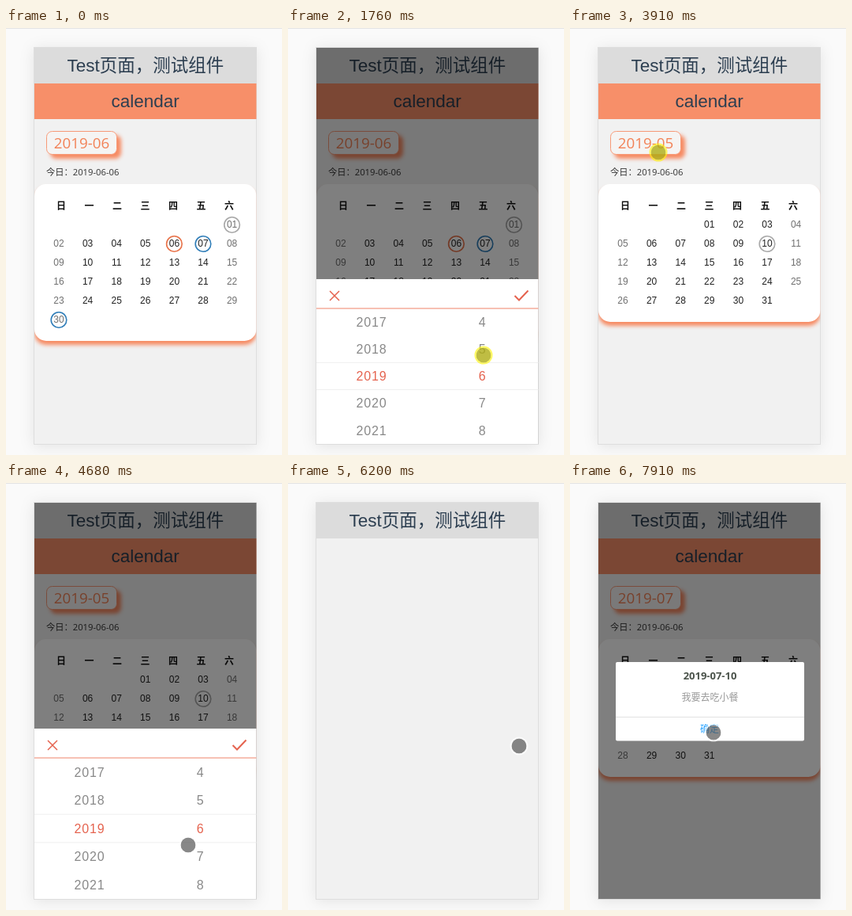
These frames come from a looping animation (350 px wide and 539 px high, 8 s). An HTML page:

```html
<!DOCTYPE html>
<html lang="zh-CN">
<head>
<meta charset="utf-8">
<title>calendar</title>
<style>
html, body { margin: 0; width: 100%; height: 100%; overflow: hidden; background: #fafafa; }
svg { display: block; width: 350px; height: 539px; font-family: "Liberation Sans", "Noto Sans CJK SC", "Noto Sans CJK", sans-serif; }
.human { font-family: "Open Sans", "Noto Sans", "Noto Sans CJK SC", "Noto Sans CJK", sans-serif; }
.mid { text-anchor: middle; }
.big { font-size: 22.5px; fill: #2c3e50; }
.pill { filter: drop-shadow(5px 5px 2.5px #f68a62); }
.card { filter: drop-shadow(0 5px 2.5px #f68a62); }
.phone { filter: drop-shadow(0 2px 9px rgba(0, 0, 0, .09)); }
.pick { font-size: 16px; letter-spacing: .8px; }
.icon { fill: none; stroke: #e5634f; stroke-width: 1.5; }
</style>
</head>
<body>
<svg id="stage" viewBox="0 0 350 539">
  <clipPath id="screen"><rect x="36" y="25" width="281.5" height="500"/></clipPath>
  <path d="M0 .5H350" stroke="#e4e4e4"/>
  <rect class="phone" x="35.5" y="24.5" width="282" height="501" fill="#f1f1f1" stroke="#dedede"/>
  <g clip-path="url(#screen)">
    <rect x="36" y="25" width="282" height="45" fill="#dcdcdc"/>
    <text class="mid big" x="177" y="55">Test页面，测试组件</text>
    <g id="page">
      <rect x="36" y="70" width="282" height="45" fill="#f78f69"/>
      <text class="mid big" x="176.7" y="100">calendar</text>
      <rect class="pill" x="51.5" y="130.5" width="89" height="29" rx="7" fill="#f5f4f3" stroke="#f79a78"/>
      <text id="month" class="mid human" x="96" y="152" font-size="18.75" fill="#f28257"></text>
      <text class="human" x="51" y="186" font-size="11.25" fill="#333">今日：2019-06-06</text>
    </g>
    <rect id="shade" x="36" y="25" width="282" height="500"/>
    <g id="sheets"></g>
    <g id="dialog">
      <rect x="58" y="226" width="239" height="99.5" rx="2" fill="#fff"/>
      <path d="M58 295.5H297" stroke="#e2e2e2"/>
      <g class="mid" font-size="12">
        <text class="human" x="177.5" y="247.5" font-size="13" font-weight="700" fill="#4a524a">2019-07-10</text>
        <text x="177.5" y="274.5" fill="#999">我要去吃小餐</text>
        <text x="177" y="314.5" fill="#26a2ff">确定</text>
      </g>
    </g>
  </g>
  <g id="cursor">
    <circle r="9.5"/>
    <circle r="10.5" fill="none" stroke-width="2"/>
  </g>
</svg>
<script>
const LOOP = 8000, TICK = 76.7, LEAD = 20;
const CORAL = '#e8734a', BLUE = '#2f7db8', GRAY = '#a8a8a8', RED = '#e5634f';
const $ = id => document.getElementById(id);

function add(parent, tag, attrs, text) {
  const el = document.createElementNS('http://www.w3.org/2000/svg', tag);
  for (const k in attrs) el.setAttribute(k, attrs[k]);
  if (text !== undefined) el.textContent = text;
  return parent.appendChild(el);
}
const show = (el, on) => el.style.display = on ? '' : 'none';
const ramp = (t, a, b) => Math.min(1, Math.max(0, (t - a) / (b - a)));
const smooth = p => p * p * (3 - 2 * p);
const easeOut = p => 1 - (1 - p) * (1 - p);
const within = (t, spans) => spans.some(([a, b]) => t >= a && t < b);

function makeCalendar(label, firstDay, days, marks) {
  const g = add($('page'), 'g', { class: 'mid', 'font-size': 12 });
  const rows = Math.ceil((firstDay + days) / 7);
  add(g, 'rect', { class: 'card', x: 36, y: 197, width: 281.5, height: 54 + rows * 24, rx: 15, fill: '#fff' });
  [...'日一二三四五六'].forEach((d, i) =>
    add(g, 'text', { x: 70 + i * 35.5, y: 229, 'font-weight': 700, fill: '#111' }, d));
  for (let d = 1; d <= days; d++) {
    const cell = firstDay + d - 1, col = cell % 7;
    const x = 67 + col * 36.6, y = 248 + Math.floor(cell / 7) * 24;
    if (marks[d]) add(g, 'circle', { cx: x, cy: y + .5, r: 9.8, fill: 'none', stroke: marks[d], 'stroke-width': 1.6 });
    add(g, 'text', { x, y: y + 4.2, fill: col % 6 ? '#222' : '#707070' }, String(d).padStart(2, '0'));
  }
  return { g, label };
}

function makeSheet(top, id) {
  const g = add($('sheets'), 'g', { class: 'mid pick' });
  const body = top + 37, row = (525 - body) / 5;
  const rowY = i => body + row * (i + .5) + 5.7;
  add(g, 'rect', { x: 36, y: top, width: 282, height: 216, fill: '#fff' });
  add(g, 'path', { d: `M53 ${top + 15}l12 12m0 -12l-12 12`, class: 'icon' });
  add(g, 'path', { d: `M287.5 ${top + 21}l5.5 5.5l11.5 -12`, class: 'icon', style: 'stroke-width:2' });
  add(g, 'path', { d: `M36 ${body}H318`, stroke: '#f4ad9b', 'stroke-width': 1.6 });
  add(g, 'path', { d: `M36 ${body + 2 * row}H318M36 ${body + 3 * row}H318`, stroke: '#efefef' });
  for (let i = 0; i < 5; i++)
    add(g, 'text', { x: 106, y: rowY(i), fill: i === 2 ? RED : '#888' }, 2017 + i);
  const clip = add(g, 'clipPath', { id });
  add(clip, 'rect', { x: 177, y: body + 1, width: 141, height: 525 - body });
  const column = add(add(g, 'g', { 'clip-path': `url(#${id})` }), 'g', {});
  const months = Array.from({ length: 12 }, (_, i) => add(column, 'text', { x: 246.5, y: rowY(i - 3) }, i + 1));
  return (opened, shift) => {
    show(g, opened > 0);
    g.setAttribute('transform', `translate(0 ${(1 - opened) * (525 - top)})`);
    column.setAttribute('transform', `translate(0 ${shift * row})`);
    months.forEach((m, i) => m.setAttribute('fill', i + 1 === 6 - Math.round(shift) ? RED : '#888'));
  };
}

const june = makeCalendar('2019-06', 6, 30, { 1: GRAY, 6: CORAL, 7: BLUE, 30: BLUE });
const may = makeCalendar('2019-05', 3, 31, { 10: GRAY });
const july = makeCalendar('2019-07', 1, 31, { 10: BLUE });
const firstSheet = makeSheet(317, 'columnA');
const secondSheet = makeSheet(310, 'columnB');

// time, x, y
const path = [
  [150, 314, 300], [600, 108, 154], [1080, 108, 154], [1611, 248, 413], [1765, 248, 413],
  [2070, 248, 447], [2150, 248, 447], [2530, 294, 334], [3070, 294, 334], [3758, 112, 157],
  [4150, 112, 157], [4679, 231, 457], [4909, 245, 487], [5000, 245, 487], [5216, 246, 481],
  [5310, 246, 481], [5600, 246, 446], [5700, 246, 446], [6136, 293, 332], [6530, 293, 332],
  [6980, 168, 275], [7500, 168, 275], [7895, 182, 315]
];
const presses = [[600, 680], [1750, 2110], [2515, 2670], [3900, 4050], [5210, 5650], [6120, 6200], [7280, 7430]];
const reloads = [[2670, 2750], [6190, 6270]];

function cursorAt(t) {
  const i = path.findIndex(k => k[0] > t);
  if (i < 0) return path[path.length - 1].slice(1);
  if (i === 0) return path[0].slice(1);
  const [t0, x0, y0] = path[i - 1], [t1, x1, y1] = path[i];
  const p = smooth(ramp(t, t0, t1));
  return [x0 + (x1 - x0) * p, y0 + (y1 - y0) * p];
}

function drawCursor(t) {
  const cursor = $('cursor'), [fill, ring] = cursor.children;
  const pressed = within(t, presses);
  show(cursor, t >= 150);
  cursor.setAttribute('transform', `translate(${cursorAt(t)})`);
  fill.setAttribute('fill', pressed ? 'rgba(175,172,20,.8)' : 'rgba(80,80,80,.68)');
  ring.setAttribute('stroke', pressed ? 'rgba(255,245,0,.62)' : 'rgba(255,255,255,.62)');
}

function draw(t) {
  const current = t < 2700 ? june : t < 6230 ? may : july;
  for (const c of [june, may, july]) show(c.g, c === current);
  $('month').textContent = current.label;
  show($('page'), !within(t, reloads));

  const shade = t < 2670 ? ramp(t, 670, 760) : t < 6190 ? ramp(t, 4040, 4130) : ramp(t, 7430, 7630);
  $('shade').setAttribute('opacity', shade * .5);

  firstSheet(t < 2670 ? easeOut(ramp(t, 768, 996)) : 0, smooth(ramp(t, 1765, 2070)));
  secondSheet(t < 6190 ? easeOut(ramp(t, 4140, 4370)) : 0, -smooth(ramp(t, 5310, 5600)));

  const pop = easeOut(ramp(t, 7430, 7630)), scale = .7 + .3 * pop;
  $('dialog').setAttribute('opacity', pop);
  $('dialog').setAttribute('transform', `translate(177.5 275.5) scale(${scale}) translate(-177.5 -275.5)`);
  drawCursor(t);
}

const start = performance.now();
function frame() {
  const t = (performance.now() - start) % LOOP;
  draw(Math.floor((t + LEAD) / TICK) * TICK);
  requestAnimationFrame(frame);
}
frame();
</script>
</body>
</html>
```
